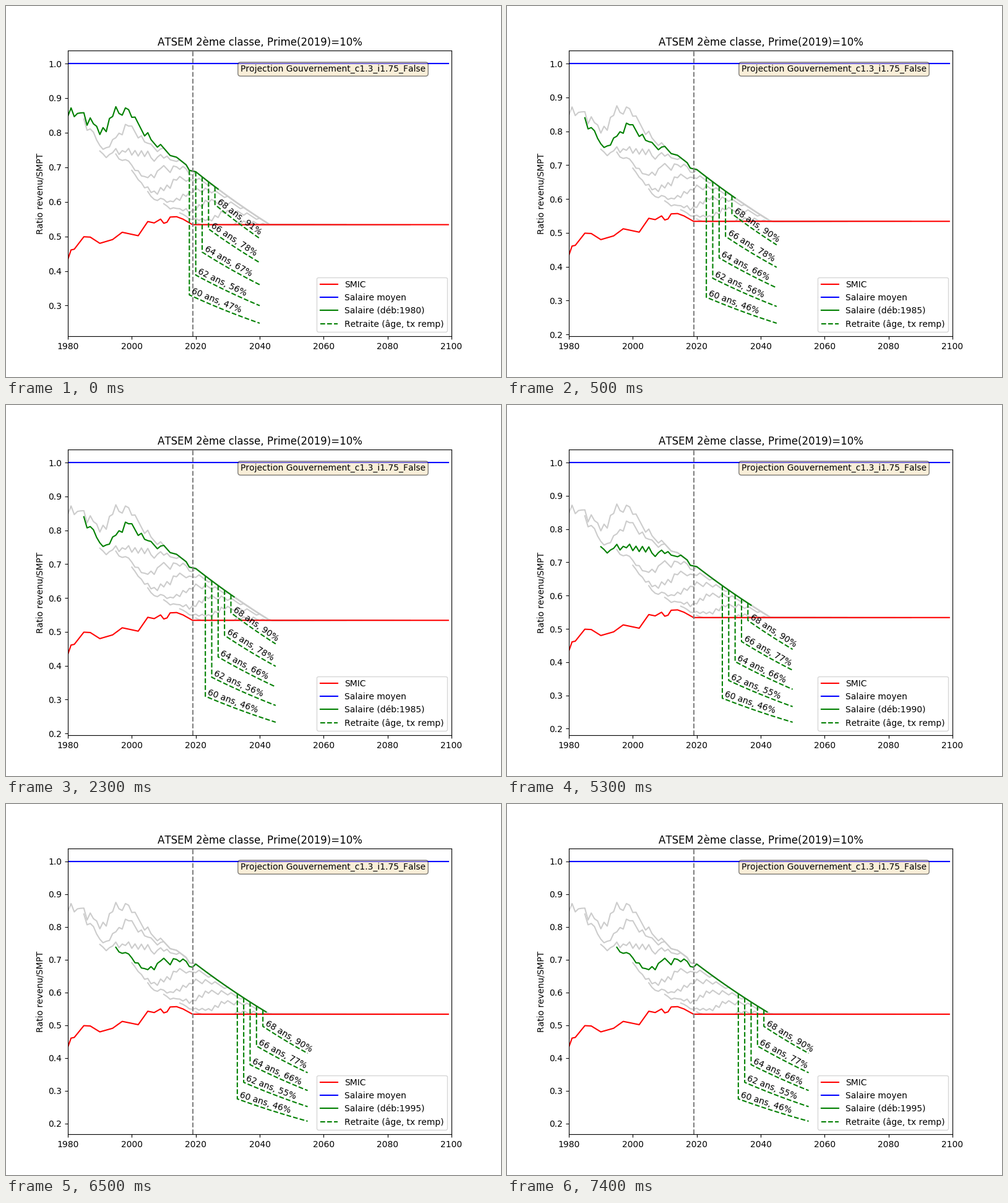
A matplotlib script that plays this animation: 800 by 600 pixels, repeating every 8000 ms.

```python
import matplotlib.pyplot as plt
import numpy as np
from matplotlib.animation import FuncAnimation

CAREER = 47                # years of salary drawn per career
GROWTH = 1.013             # yearly growth of the mean wage
BONUS, BONUS_STEP = 0.10, 0.0023
STARTS = range(1980, 2041, 5)

# Pay ladder: seniority at which each step begins, and its index points.
SENIORITY = [0, 1, 3, 5, 7, 9, 11, 13, 15, 18, 21, 25]
POINTS = np.array([329, 330, 333, 336, 343, 350, 364, 380, 390, 402, 411, 418])

# Turning points (year, ratio) of the minimum wage and of the top step.
SMIC = [(1980, 0.434), (1981, 0.461), (1982, 0.463), (1985, 0.499),
        (1987, 0.498), (1990, 0.480), (1994, 0.491), (1997, 0.512),
        (2002, 0.502), (2005, 0.543), (2007, 0.539), (2009, 0.550),
        (2010, 0.538), (2011, 0.541), (2012, 0.556), (2014, 0.557),
        (2016, 0.550), (2019, 0.534)]
TOP = [(1980, 1.077), (1981, 1.104), (1982, 1.072), (1984, 1.076),
       (1985, 1.067), (1986, 1.022), (1987, 1.027), (1988, 1.006),
       (1990, 0.949), (1992, 0.922), (1993, 0.925), (1995, 0.938),
       (1996, 0.917), (1999, 0.901), (2000, 0.878), (2004, 0.804),
       (2005, 0.800), (2006, 0.780), (2008, 0.758), (2009, 0.766),
       (2012, 0.734), (2014, 0.729), (2017, 0.707), (2018, 0.691),
       (2020, 0.687)]


def smic(years):
    return np.interp(years, *zip(*SMIC))


def top_pay(years):
    """Past values, then a frozen index with a slowly rising bonus."""
    ahead = np.maximum(0, years - 2020)
    bonus = 1 + ahead * BONUS_STEP / (1 + BONUS)
    return np.interp(years, *zip(*TOP)) * bonus / GROWTH ** ahead


def salary(start, years):
    step = np.searchsorted(SENIORITY, years - start, side="right") - 1
    return np.maximum(smic(years), top_pay(years) * POINTS[step] / POINTS[-1])


def plot_career(start, **style):
    years = np.arange(start, start + CAREER + 1)
    ax.plot(years, salary(start, years), **style)


def pension_rate(start, k):
    drift = 0.012 * (1 - np.exp((1980 - start) / 5.5))
    return 0.468 + 0.0905 * k + 0.005 * k * k - drift


def plot_pension(start, k):
    """Dashed pension for retirement at 60 + 2k, labelled along its slope."""
    retire, end = start + 38 + 2 * k, start + 60
    rate = pension_rate(start, k)
    years = np.arange(retire, end + 1)
    ratio = rate * salary(start, retire - 1) / GROWTH ** (years - retire)
    ax.plot([retire, *years], [salary(start, retire), *ratio], "--",
            color="green", label="" if k else "Retraite (âge, tx remp)")
    slope = np.degrees(np.arctan2(ratio[-1] - ratio[0], end - retire))
    ax.text(retire + 0.5, ratio[0] + 0.005, f"{60 + 2 * k} ans, {rate:.0%}",
            rotation=slope, rotation_mode="anchor",
            transform_rotates_text=True)


def draw(start):
    ax.clear()
    for other in STARTS:
        if other != start:
            plot_career(other, color="0.8")

    years = np.arange(1980, 2100)
    ax.plot(years, smic(years), color="red", label="SMIC")
    ax.plot(years, np.ones(len(years)), color="blue", label="Salaire moyen")
    plot_career(start, color="green", label=f"Salaire (déb:{start})")
    for k in range(5):
        plot_pension(start, k)
    ax.axvline(2019, color="grey", linestyle="--")
    ax.set_xlim(1980, 2100)

    ax.text(0.45, 0.95, "Projection Gouvernement_c1.3_i1.75_False",
            transform=ax.transAxes, va="top",
            bbox=dict(boxstyle="round", facecolor="wheat", alpha=0.5))
    ax.set_title("ATSEM 2ème classe, Prime(2019)=10%")
    ax.set_ylabel("Ratio revenu/SMPT")
    ax.legend(loc="lower right")


def update(frame):
    # Half-second frames: the first view is short, the next two last 3 s.
    draw(1980 + 5 * ((frame + 5) // 6))
    return []


plt.rcParams["font.family"] = "DejaVu Sans"
plt.rcParams["text.kerning_factor"] = 6
fig, ax = plt.subplots(figsize=(8, 6), dpi=100)
anim = FuncAnimation(fig, update, frames=16, interval=500, repeat=True,
                     repeat_delay=0, init_func=lambda: update(0))
plt.show()
```
